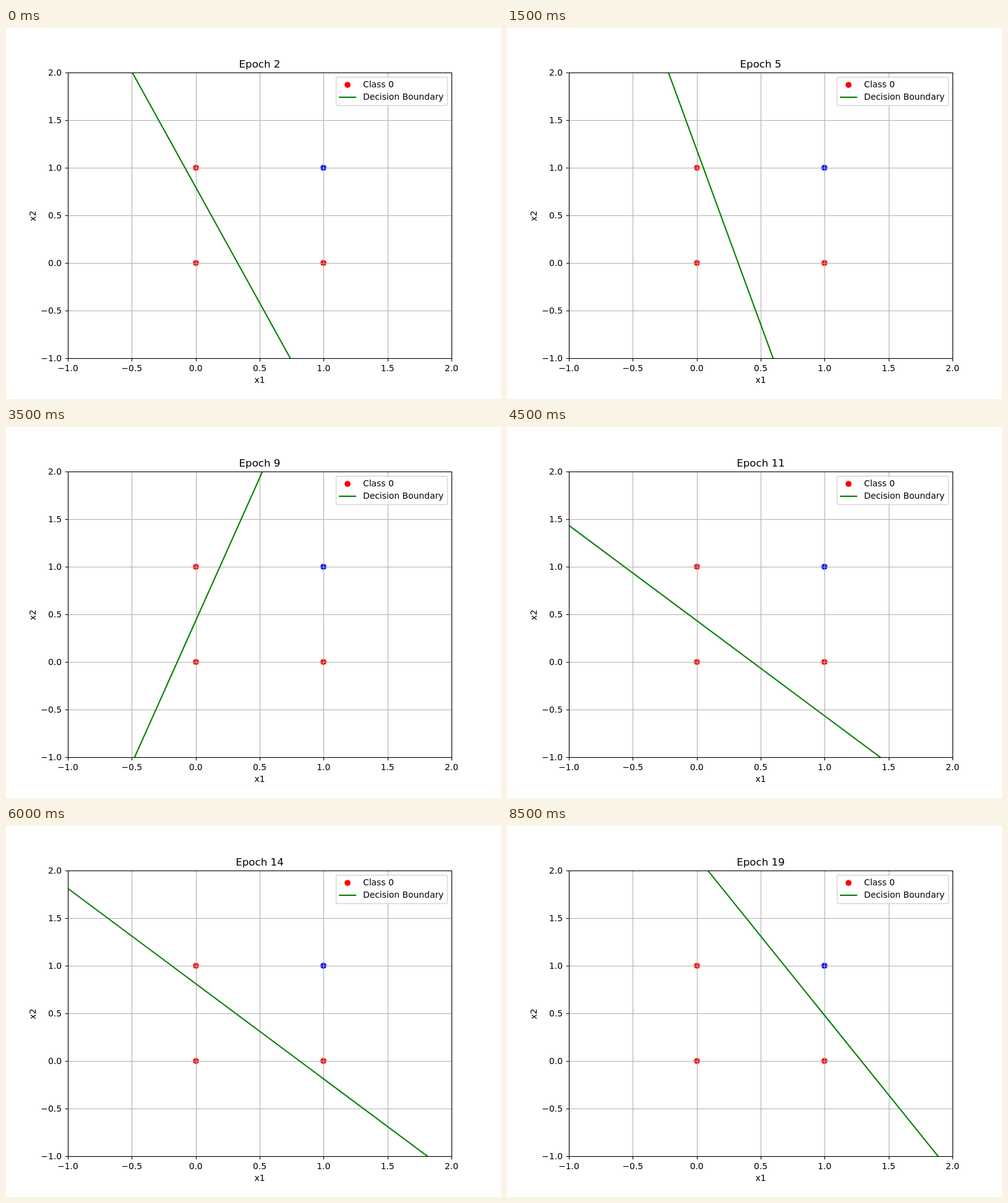
Recreate the animation shown at these times as an HTML page. Size 800 by 600 pixels, loop 9000 ms.

```html
<!DOCTYPE html>
<html lang="en">
<head>
<meta charset="utf-8">
<title>Perceptron training</title>
<style>
  html, body { margin: 0; width: 100%; height: 100%; overflow: hidden; background: #fff; }
  svg { display: block; width: 800px; height: 600px; }
  text { font: 13.89px "DejaVu Sans", sans-serif; }
  .middle { text-anchor: middle; }
  .end { text-anchor: end; }
  #title { font-size: 16.67px; }
  .boundary { stroke: green; stroke-width: 2.083; }
</style>
</head>
<body>
<svg viewBox="0 0 800 600">
  <clipPath id="axes"><rect x="100" y="72" width="620" height="462"/></clipPath>
  <g id="points"></g>
  <g id="grid" stroke="#b0b0b0" stroke-width="1.11"></g>
  <g id="ticks" stroke="#000" stroke-width="1.11"></g>
  <g clip-path="url(#axes)"><line id="boundary" class="boundary"/></g>
  <rect x="100.5" y="72.5" width="620" height="462" fill="none" stroke="#000" stroke-width="1.11"/>
  <g id="labels"></g>
  <text id="title" class="middle" x="410" y="64"></text>
  <text class="middle" x="410" y="574">x1</text>
  <text class="middle" transform="translate(48 304) rotate(-90)">x2</text>
  <rect x="533.5" y="79.5" width="180" height="46" rx="2.8" fill="#fff" stroke="#ccc" stroke-width="1.39" opacity=".8"/>
  <circle cx="552" cy="92" r="4.86" fill="red"/>
  <line class="boundary" x1="538" x2="566" y1="112" y2="112"/>
  <text x="577" y="96">Class 0</text>
  <text x="577" y="116">Decision Boundary</text>
</svg>
<script>
const STEP = 500, FIRST_EPOCH = 2, LAST_EPOCH = 19;
const samples = [[0, 0, 0], [0, 1, 0], [1, 0, 0], [1, 1, 1]]; // x1, x2, class

const byId = id => document.getElementById(id);
const px = x => 100 + (x + 1) * 620 / 3;
const py = y => 72 + (2 - y) * 154;

function add(parent, tag, attributes, content = "") {
  const node = document.createElementNS("http://www.w3.org/2000/svg", tag);
  for (const name in attributes) node.setAttribute(name, attributes[name]);
  node.textContent = content;
  byId(parent).append(node);
}

function drawAxes() {
  for (const [x, y, label] of samples) {
    add("points", "circle", { cx: Math.round(px(x)), cy: py(y), r: 4.86, fill: label ? "blue" : "red" });
  }
  for (let v = -1; v <= 2; v += 0.5) {
    const x = Math.round(px(v)) + 0.5, y = py(v) + 0.5;
    const text = v.toFixed(1).replace("-", "\u2212");
    add("grid", "path", { d: `M${x} 72V534M100 ${y}H720` });
    add("ticks", "path", { d: `M${x} 534.5v4.86M100.5 ${y}h-4.86` });
    add("labels", "text", { class: "middle", x: px(v), y: 555 }, text);
    add("labels", "text", { class: "end", x: 90, y: py(v) + 5 }, text);
  }
}

// One pass of the perceptron rule, in units of the learning rate.
function train({ b, w1, w2 }) {
  for (const [x1, x2, label] of samples) {
    const error = label - (b + w1 * x1 + w2 * x2 > 0 ? 1 : 0);
    b += error;
    w1 += error * x1;
    w2 += error * x2;
  }
  return { b, w1, w2 };
}

const states = [{ b: 2.783, w1: -8.5, w2: -3.5 }];
while (states.length <= LAST_EPOCH - FIRST_EPOCH) states.push(train(states.at(-1)));

function render() {
  const index = Math.floor(performance.now() / STEP) % states.length;
  const { b, w1, w2 } = states[index];
  const lineY = x => py(-(b + w1 * x) / w2);
  const ends = { x1: px(-1), y1: lineY(-1), x2: px(2), y2: lineY(2) };
  for (const name in ends) byId("boundary").setAttribute(name, ends[name]);
  byId("title").textContent = `Epoch ${FIRST_EPOCH + index}`;
  requestAnimationFrame(render);
}

drawAxes();
render();
</script>
</body>
</html>
```
